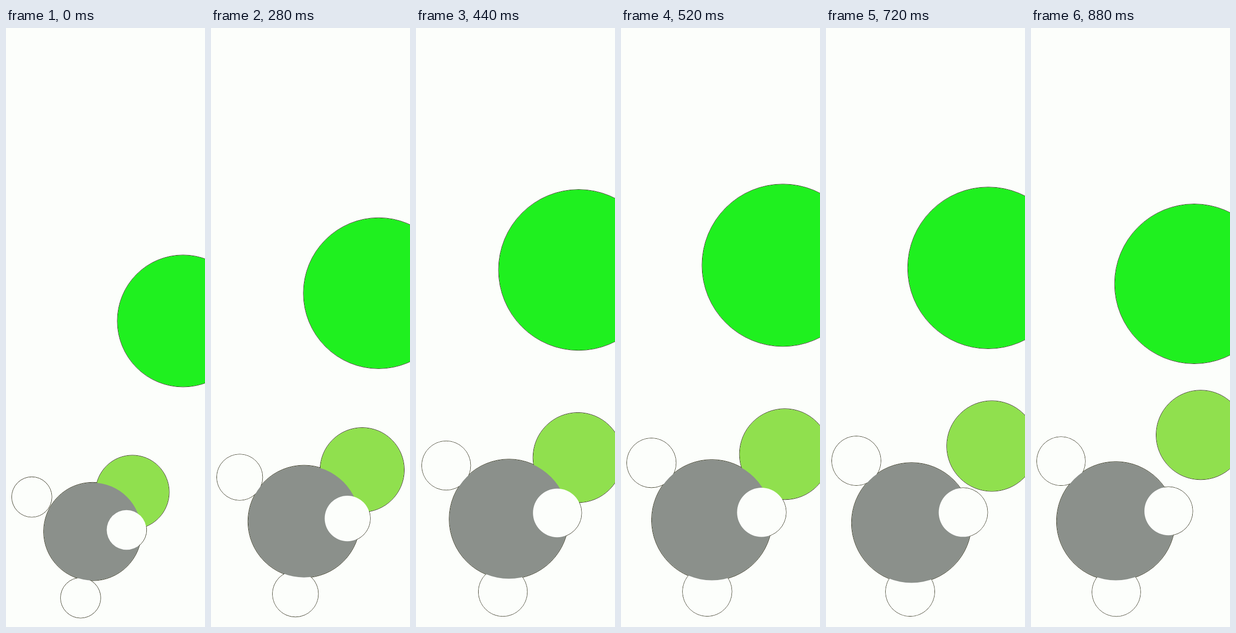
An HTML page with a canvas that plays this animation: 400 px wide and 1200 px high, repeating every 920 ms.

```html
<!DOCTYPE html>
<html lang="en">
<head>
<meta charset="utf-8">
<title>Bubbles</title>
<style>
  html, body { margin: 0; width: 100%; height: 100%; overflow: hidden; background: #fcfefb; }
  canvas { display: block; }
</style>
</head>
<body>
<canvas id="stage" width="400" height="1200"></canvas>
<script>
const ctx = document.getElementById('stage').getContext('2d');
const LOOP = 920, STEP = 40, LAST = LOOP - STEP;
const PAPER = '#fcfefb', INK = '#25250f';

// The whole group swells from its lower left corner.
const ORIGIN = { x: 11.5, y: 1197 };
const RIGHT_WALL = 488;

// Back to front. x and y are drift paths at full scale, y upwards.
const balls = [
  { size: 163.7, fill: '#1ff01f', atWall: true, y: drift(756, 721, 728, 700.5) },
  { size: 50, fill: PAPER, x: drift(50), y: drift(319, 322, 330, 337) },
  { size: 50, fill: PAPER, x: drift(171.6, 171, 161, 163.7), y: drift(68.6) },
  { size: 91.7, fill: '#90e04e', x: drift(300.6, 317, 321, 337.3), y: drift(331, 338, 350, 390.7) },
  { size: 122, fill: '#8b908b', x: drift(201.4, 189, 168, 162.7), y: drift(233.3, 225, 210, 214) },
  { size: 50, fill: PAPER, x: drift(286, 284, 270, 271), y: drift(237.3, 232, 228, 234.5) }
];

// Cubic through four points evenly spaced in time; one value stays put.
function drift(a, b = a, c = a, d = a) {
  return u => {
    const p = 3 * u, q = p - 1, r = p - 2, s = p - 3;
    return (-a * q * r * s + 3 * b * p * r * s - 3 * c * p * q * s + d * p * q * r) / 6;
  };
}

// S-shaped growth that sags slightly at the end.
function swell(t) {
  const sec = t / 1000;
  const rise = sec ** 4 / (sec ** 4 + 0.2557 ** 4);
  return 0.807 + 0.197 * rise - 0.085 * Math.max(0, sec - 0.58);
}

function place(ball, scale, u) {
  const r = ball.size * scale;
  return {
    r,
    fill: ball.fill,
    x: ball.atWall ? RIGHT_WALL - r : ORIGIN.x + scale * ball.x(u),
    y: ORIGIN.y - scale * ball.y(u)
  };
}

function disc(x, y, r) {
  ctx.beginPath();
  ctx.arc(x, y, r, 0, Math.PI * 2);
}

function draw(t) {
  const scale = swell(t);
  const placed = balls.map(ball => place(ball, scale, t / LAST));
  ctx.fillStyle = PAPER;
  ctx.fillRect(0, 0, 400, 1200);

  // Outlines lie beneath all fills, so they vanish wherever balls overlap.
  ctx.strokeStyle = INK;
  ctx.lineWidth = 1;
  for (const b of placed) {
    disc(b.x, b.y, b.r);
    ctx.stroke();
  }
  for (const b of placed) {
    disc(b.x, b.y, b.r - 0.5);
    ctx.fillStyle = b.fill;
    ctx.fill();
  }
}

const start = performance.now();
function tick() {
  const t = (performance.now() - start) % LOOP;
  draw(Math.floor(t / STEP) * STEP);
  requestAnimationFrame(tick);
}
tick();
</script>
</body>
</html>
```
